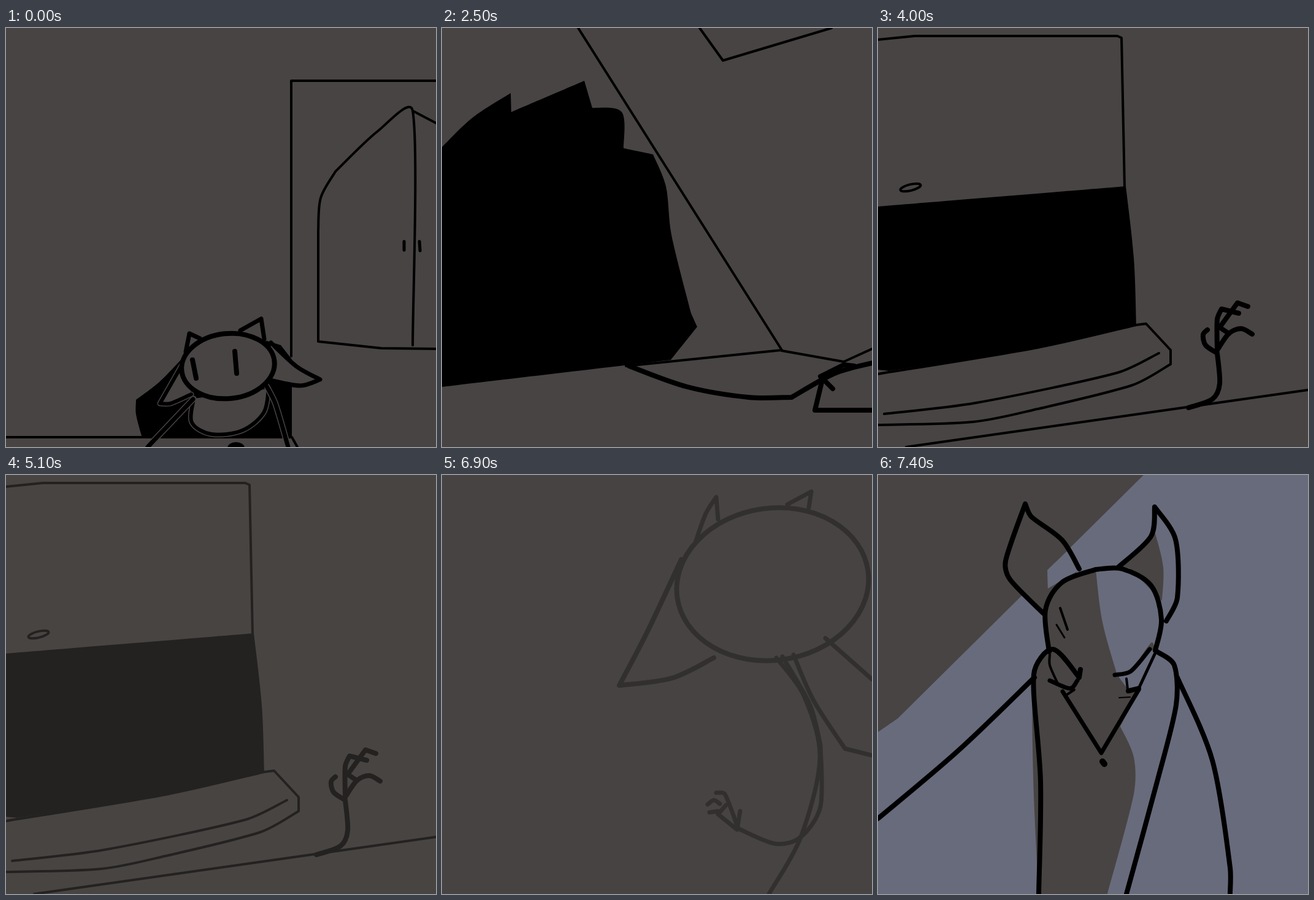
Write an HTML page with a canvas that moves like this. It is 701x683 px and loops after 8000 ms.

```html
<!DOCTYPE html>
<html lang="en">
<head>
<meta charset="utf-8">
<title>Night visitor</title>
<style>
  html, body { margin: 0; width: 100%; height: 100%; overflow: hidden; background: #484443; }
  canvas { display: block; }
</style>
</head>
<body>
<canvas id="stage" width="701" height="683"></canvas>
<script>
const W = 701, H = 683, LOOP = 8000, STEP = 100;
const WALL = '#484443', INK = '#000', MOON = '#686b7c';
const THIN = 4, MID = 7, BOLD = 8;
const ctx = document.getElementById('stage').getContext('2d');
ctx.lineCap = ctx.lineJoin = 'round';

// "x,y x,y / x,y": a smooth run through key points; each slash makes a corner.
function trace(text) {
  const path = new Path2D();
  let last = null;
  for (const run of text.split('/')) {
    const p = run.trim().split(/\s+/).map(s => s.split(',').map(Number));
    if (last) p.unshift(last); else path.moveTo(...p[0]);
    for (let i = 0; i < p.length - 1; i++) {
      const a = p[i - 1] || p[i], b = p[i], c = p[i + 1], d = p[i + 2] || c;
      const len = Math.hypot(c[0] - b[0], c[1] - b[1]);
      const kb = Math.min(1 / 6, len / 3 / (Math.hypot(c[0] - a[0], c[1] - a[1]) || 1));
      const kc = Math.min(1 / 6, len / 3 / (Math.hypot(d[0] - b[0], d[1] - b[1]) || 1));
      path.bezierCurveTo(
        b[0] + (c[0] - a[0]) * kb, b[1] + (c[1] - a[1]) * kb,
        c[0] - (d[0] - b[0]) * kc, c[1] - (d[1] - b[1]) * kc, c[0], c[1]);
    }
    last = p[p.length - 1];
  }
  return path;
}

function oval(x, y, rx, ry, tilt) {
  const path = new Path2D();
  path.ellipse(x, y, rx, ry, tilt * Math.PI / 180, 0, Math.PI * 2);
  return path;
}

const toPath = shape => typeof shape === 'string' ? trace(shape) : shape;

function pen(width, shape, color = INK) {
  ctx.strokeStyle = color;
  ctx.lineWidth = width;
  ctx.stroke(toPath(shape));
}

function fill(shape, color = INK) {
  ctx.fillStyle = color;
  ctx.fill(toPath(shape));
}

function solid(width, shape) {
  fill(shape, WALL);
  pen(width, shape);
}

// Ink line with a thin wall-coloured rim, visible over black.
function rimmed(width, shape, hollow) {
  pen(width + 3, shape, WALL);
  if (hollow) fill(shape, WALL);
  pen(width, shape);
}

function waiting() {
  pen(THIN, '465,535 / 465,86 / 701,86');
  pen(THIN, '0,667 / 466,667 / 475,683');
  pen(THIN, '663,517 / 663,135 605,169 537,234 / 513,277 509,330 / 509,511 / 612,522 / 701,523');
  pen(THIN, '663,135 / 701,155');
  pen(5, '649,348 / 649,362');
  pen(5, '674,348 / 675,363');

  fill('286,540 250,577 212,606 / 212,630 222,668 / 466,668 / 466,540 / 448,517 / 425,510');
  rimmed(6, '306,604 303,643 335,662 385,656 420,627 428,588', true);
  rimmed(MID, '305,605 / 231,683');
  rimmed(MID, '425,584 439,612 460,683');
  rimmed(6, '293,538 275,570 251,612 / 268,612 302,597', true);
  solid(MID, '432,513 474,552 512,573 / 480,583 430,574');
  solid(BOLD, oval(362, 551, 76, 53, -6));
  pen(MID, '293,528 299,498 / 316,506');
  pen(MID, '382,493 416,474 / 421,507');
  pen(BOLD, '304,541 / 310,571');
  pen(BOLD, '373,527 / 376,563');
  fill(oval(375, 684, 14, 9, 0));
}

function kneeling() {
  pen(THIN, '0,626 / 206,626');
  pen(THIN, '490,633 / 701,607');
  pen(THIN, '540,628 / 701,628');
  pen(THIN, '316,0 / 300,8 / 291,33 / 357,380');
  pen(THIN, '685,0 / 701,90');
  pen(THIN, '402,342 388,270 366,140 377,68 407,27 / 497,9 545,20 635,80 701,192');
  fill('418,24 / 497,9 / 567,394 / 534,402 / 530,360 517,260 488,138 455,57 418,24');
  pen(THIN, '565,394 / 701,375');
  pen(THIN, '537,398 / 542,417 / 510,417');
  pen(6, '480,273 / 482,287');
  pen(5, '559,257 / 561,266');

  fill('342,452 318,443 265,477 / 240,480 215,527 180,587 / 192,627 / 222,630 / 300,605 / 308,522');
  rimmed(BOLD, '356,453 320,490 301,560 303,609 / 265,609 220,632 / 206,618');
  pen(BOLD, '258,618 / 238,658 / 290,663 / 440,658');
  pen(BOLD, '350,459 328,507 / 327,570 / 380,545');
  pen(MID, '308,521 / 327,521');
  pen(BOLD, '360,452 346,490 / 346,532 / 383,542');
  pen(BOLD, '410,459 384,510 383,545');
  pen(BOLD, '395,480 / 412,545 / 440,655');
  pen(BOLD, '380,543 440,555 498,605 440,655 / 466,661');

  solid(MID, '493,400 514,433 542,457 / 500,463 462,447');
  pen(BOLD, '361,392 362,445 376,486 / 387,458');
  solid(BOLD, oval(425, 402, 65, 54, -5));
  rimmed(MID, '377,355 394,326 / 397,343');
  pen(MID, '424,342 / 454,323 / 450,345');
  pen(BOLD, '412,392 / 406,402 / 406,430');
}

function shadow() {
  fill('0,194 50,146 112,106 / 113,137 / 232,86 / 245,130 / 293,137 296,196 / 344,206 / 365,258 374,337 406,465 / 416,487 / 373,541 / 0,585');
  pen(THIN, '222,0 / 554,525 / 300,551');
  pen(THIN, '554,526 / 655,544 / 701,523');
  pen(THIN, '420,0 / 458,53 / 635,0');
  pen(BOLD, '305,551 400,585 500,602 570,602 / 640,563 701,546');
  pen(BOLD, '701,623 / 608,623 / 620,573');
  pen(BOLD, '672,551 / 655,549 / 617,568 / 637,588');
}

function hat() {
  pen(THIN, '0,19 / 60,13 / 390,13 / 397,16 / 402,260');
  fill('0,291 / 404,258 / 417,375 421,484 / 260,521 18,559 / 0,557');
  pen(THIN, '0,564 260,521 421,484 / 437,482 / 477,525 / 477,548 / 415,582 260,621 155,642 0,647');
  pen(THIN, '10,629 160,611 390,562 458,530');
  pen(THIN, '46,683 / 701,590');
  pen(THIN, oval(53, 260, 17, 5, -14));
  pen(BOLD, '506,619 545,605 557,580 553,530 / 534,517 530,500 537,492');
  pen(BOLD, '553,525 / 553,475 560,458 / 588,465');
  pen(BOLD, '553,525 / 572,498 592,490 610,499');
  pen(BOLD, '572,498 / 557,488 / 586,448 / 603,454');
}

function visitor() {
  pen(BOLD, oval(539, 178, 157, 124, -8));
  pen(MID, '414,107 430,63 447,36 / 450,72');
  pen(MID, '563,48 602,27 / 598,53');
  pen(BOLD, '390,138 335,255 289,343 / 375,331 443,298');
  pen(MID, '545,298 590,360 616,460 585,590 533,683');
  pen(MID, '555,296 600,375 617,440 / 617,540 585,590 543,601 480,575');
  pen(MID, '573,293 606,368 657,446 / 701,457');
  pen(MID, '625,266 701,333');
  pen(MID, '482,574 / 461,520 447,518');
  pen(MID, '486,548 / 481,578 / 450,553 / 463,538');
  pen(MID, '453,536 443,530 433,537');
  pen(MID, '450,548 / 436,550');
}

function reveal() {
  const leftEar = '270,226 215,170 208,140 240,47 / 250,68 300,106 328,153';
  const rightEar = '392,150 445,100 451,52 / 485,105 488,200 470,238';
  const skull = '279,288 273,220 300,175 355,154 / 398,153 445,180 462,235 452,286';

  fill('433,0 / 701,0 / 701,683 / 0,683 / 0,419 / 32,397', MOON);
  fill(leftEar, WALL);
  fill('328,105 / 276,155 / 277,185 / 328,155', MOON);
  fill('392,150 452,95 / 465,150 463,205 / 410,152', WALL);
  fill('428,297 446,273 451,283', WALL);
  fill('355,155 / 366,240 390,326 / 408,350 / 425,352 / 395,410 / 417,460 417,520 374,683 / 262,683 / 253,490 254,320 278,288 / 273,220 300,175', WALL);

  for (const part of [leftEar, rightEar, skull]) pen(BOLD, part);
  pen(BOLD, '0,560 130,450 255,330');
  pen(BOLD, '262,683 265,500 254,325 285,284 328,330 / 330,317');
  pen(BOLD, '455,288 483,310 486,375 455,500 405,683');
  pen(BOLD, '488,330 545,465 574,640 574,683');

  pen(THIN, '280,293 280,310 293,340');
  pen(MID, '280,335 313,348 325,335');
  pen(MID, '301,353 364,453 / 425,350');
  pen(THIN, '308,358 / 320,350');
  pen(MID, '386,326 412,320 443,284');
  pen(5, '452,290 425,348');
  pen(BOLD, '408,352 / 425,348');
  pen(THIN, '405,332 / 407,349');

  pen(THIN, '297,217 / 309,252');
  pen(3, '291,244 / 304,265');
  pen(2, '393,363 / 411,362');
  pen(10, '366,467 / 369,471');
}

// Fade in from start to full; from out to gone, drop to dim and fade away.
const scenes = [
  { paint: waiting, start: 0, full: 0, out: 1000, gone: 1000 },
  { paint: kneeling, start: 1200, full: 1300, out: 2300, gone: 2300 },
  { paint: shadow, start: 2400, full: 2500, out: 3500, gone: 3700, dim: .5 },
  { paint: hat, start: 3800, full: 4000, out: 5100, gone: 5400, dim: .5 },
  { paint: visitor, start: 5900, full: 5900, out: 6900, gone: 7100, dim: .3 },
  { paint: reveal, start: 7200, full: 7400, out: LOOP, gone: LOOP }
];

function opacity(s, t) {
  if (t < s.full) return (t - s.start + STEP) / (s.full - s.start + STEP);
  if (t >= s.out) return s.dim * (1 - (t - s.out) / (s.gone - s.out));
  return 1;
}

function cover(alpha) {
  ctx.globalAlpha = alpha;
  ctx.fillStyle = WALL;
  ctx.fillRect(0, 0, W, H);
  ctx.globalAlpha = 1;
}

function tick() {
  const t = Math.floor(performance.now() % LOOP / STEP) * STEP;
  const scene = scenes.find(s => t >= s.start && t < s.gone);
  cover(1);
  if (scene) {
    scene.paint();
    cover(1 - opacity(scene, t));
  }
  requestAnimationFrame(tick);
}
tick();
</script>
</body>
</html>
```
